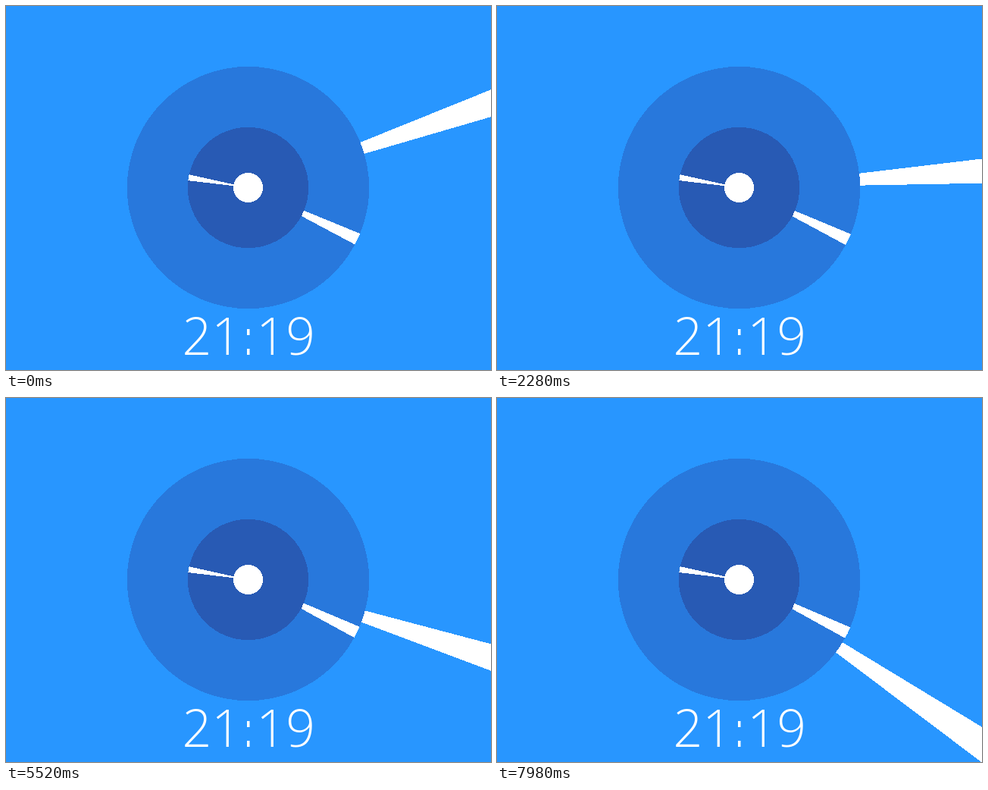
Animation of 640 by 480 pixels, one loop 8 s. Source, as an HTML page:

```html
<!DOCTYPE html>
<html lang="en">
<head>
<meta charset="utf-8">
<title>Radial clock</title>
<style>
  html, body { margin: 0; width: 100%; height: 100%; overflow: hidden; background: #2896ff; }
  svg { display: block; width: 100vw; height: 100vh; }
  text { font: 300 68px "Open Sans", "Noto Sans", sans-serif; }
</style>
</head>
<body>
<svg viewBox="0 0 640 480">
  <rect width="640" height="480" fill="#2896ff"/>
  <g transform="translate(319.5 239.5)" fill="#fff" shape-rendering="crispEdges">
    <path id="second"/>
    <circle r="159.7" fill="#2878dc"/>
    <path id="minute"/>
    <circle r="79.7" fill="#285ab4"/>
    <path id="hour"/>
    <circle r="19.7"/>
  </g>
  <g fill="#fff">
    <text x="232.5" y="460">21</text>
    <rect x="318" y="426" width="3.5" height="8"/>
    <rect x="318" y="452" width="3.5" height="8"/>
    <text x="408" y="460" text-anchor="end">19</text>
  </g>
</svg>
<script>
  const LOOP = 8000, TICK = 30, TICKS_PER_SECOND = 30;
  const START_SECOND = 11.817, SPREAD = 0.1;
  const lengths = { second: 520, minute: 159.7, hour: 79.7 };

  // Wedges are 0.1 rad wide and start at the centre, pointing right.
  for (const [id, r] of Object.entries(lengths)) {
    const x = r * Math.cos(SPREAD / 2), y = r * Math.sin(SPREAD / 2);
    document.getElementById(id).setAttribute("d", `M0 0L${x} ${-y}A${r} ${r} 0 0 1 ${x} ${y}Z`);
  }

  function point(id, degrees) {
    document.getElementById(id).setAttribute("transform", `rotate(${degrees - 90})`);
  }

  function draw(now) {
    const tick = Math.floor((now % LOOP) / TICK);
    const seconds = START_SECOND + tick / TICKS_PER_SECOND;
    const minutes = 19 + seconds / 60;
    const hours = 9 + minutes / 60;
    point("second", seconds * 6);
    point("minute", minutes * 6);
    point("hour", hours * 30);
  }

  const start = performance.now();
  function frame() {
    draw(performance.now() - start);
    requestAnimationFrame(frame);
  }
  frame();
</script>
</body>
</html>
```
